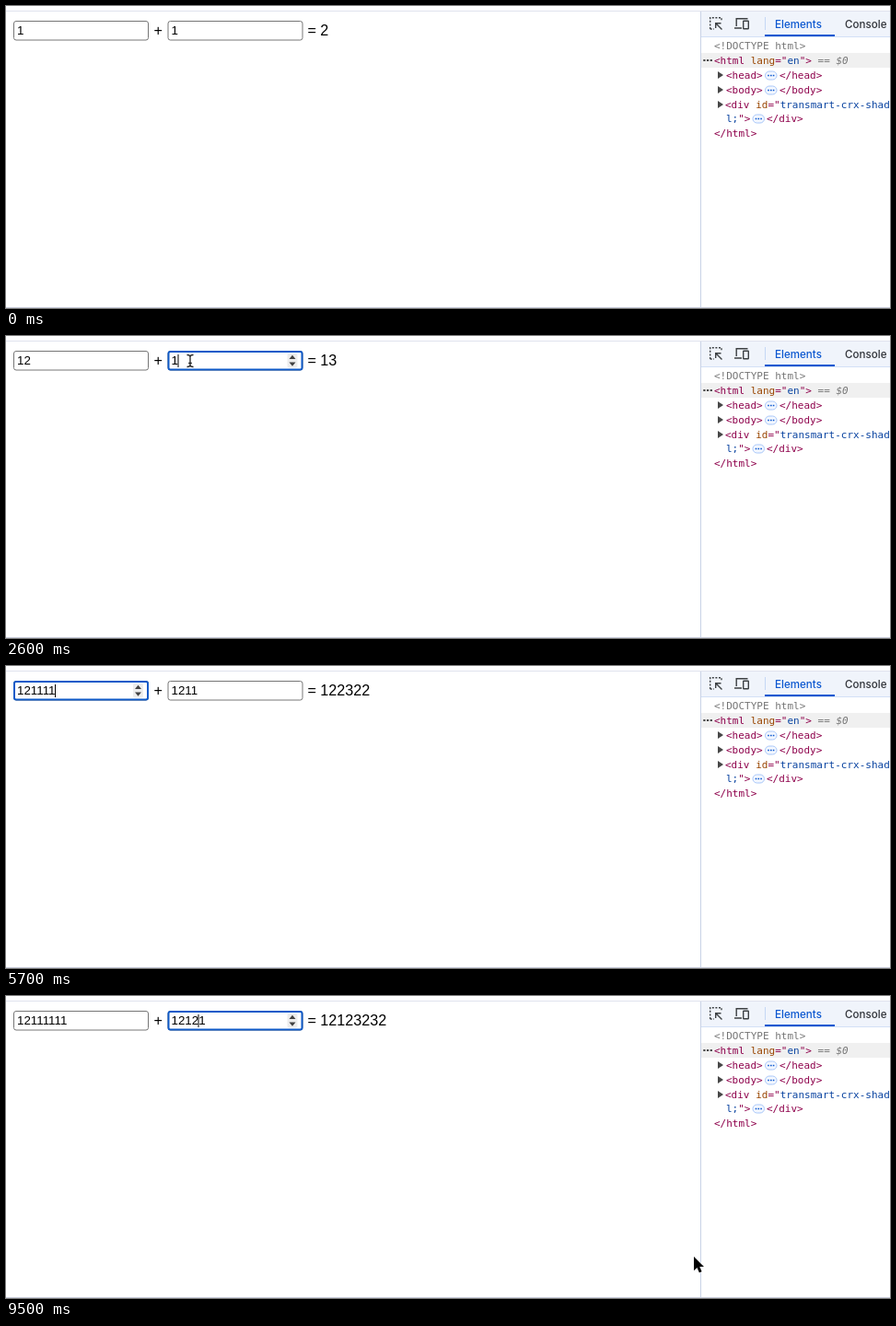
These frames come from a looping animation (960 by 328 pixels, 9.6 s). An HTML page:

```html
<!DOCTYPE html>
<html lang="en">
<head>
<meta charset="utf-8">
<title>Sum of two inputs</title>
<style>
  html, body { margin: 0; width: 100%; height: 100%; overflow: hidden; background: #fff; }
  svg { display: block; }
  text { white-space: pre; }
  .page { font: 16.2px "Liberation Sans", Arial, sans-serif; fill: #000; }
  .value { font: 13.333px "Liberation Sans", Arial, sans-serif; fill: #000; }
  .tab { font: 500 11.6px Inter, sans-serif; }
  .code { font: 11px "DejaVu Sans Mono", monospace; fill: #8e004b; }
  .attr { fill: #994500; }
  .str { fill: #0842a0; }
  .dim { fill: #757575; }
</style>
</head>
<body>
<svg width="960" height="328" viewBox="0 0 960 328">
  <defs>
    <g id="badge">
      <rect x=".5" y="-4.5" width="12.5" height="9" rx="4.5" fill="#f3f7fe" stroke="#a8c7fa"/>
      <path d="M3.2 0h1.6M6 0h1.6M8.8 0h1.6" stroke="#0b57d0" stroke-width="1.7"/>
    </g>
    <path id="fold" d="M0 -4L6 0L0 4Z" fill="#474747"/>
  </defs>

  <path d="M0 5.5H960" stroke="#dfe2ee"/>

  <g id="fields"></g>
  <text class="page" x="160.5" y="32">+</text>
  <text class="page" x="327.4" y="32" id="sum"></text>

  <rect x="755" y="6" width="205" height="27" fill="#f0f4fb"/>
  <path d="M755 33.5H960" stroke="#d3e0f6"/>
  <path d="M824.5 12V26" stroke="#c4d7f5"/>
  <rect x="824" y="31" width="76" height="2" fill="#0b57d0"/>
  <text class="tab" x="835" y="23.7" fill="#0b57d0">Elements</text>
  <text class="tab" x="911" y="23.7" fill="#303338">Console</text>

  <g fill="none" stroke="#3c4043" stroke-width="1.4">
    <path d="M764.7 25V12.7H777V17M764.7 25H769" stroke-dasharray="2 1.6"/>
    <path d="M777.5 25.5L771 19M770.7 24V18.7H776.5"/>
    <path d="M793.2 22V13.7H805.5M791 24H799"/>
    <rect x="800.7" y="16.2" width="5.6" height="8.6" rx=".6"/>
  </g>

  <rect x="755" y="51" width="205" height="16" fill="#f0f0f0"/>
  <path d="M757.3 59h2.2M761 59h2.2M764.7 59h2.2" stroke="#474747" stroke-width="2"/>
  <g class="code">
    <text class="dim" x="769" y="47">&lt;!DOCTYPE html&gt;</text>
    <text x="769" y="63">&lt;html <tspan class="attr">lang</tspan>="<tspan class="str">en</tspan>"&gt;<tspan class="dim"> == <tspan font-style="italic">$0</tspan></tspan></text>
    <text x="782" y="79">&lt;head&gt;</text>
    <text x="840" y="79">&lt;/head&gt;</text>
    <text x="782" y="95">&lt;body&gt;</text>
    <text x="840" y="95">&lt;/body&gt;</text>
    <text x="781" y="111">&lt;div <tspan class="attr">id</tspan>="<tspan class="str">transmart-crx-shad</tspan></text>
    <text x="782" y="126"><tspan class="str">l;</tspan>"&gt;</text>
    <text x="826" y="126">&lt;/div&gt;</text>
    <text x="769" y="141.5">&lt;/html&gt;</text>
  </g>
  <use href="#fold" x="773" y="75"/>
  <use href="#fold" x="773" y="91"/>
  <use href="#fold" x="773" y="107"/>
  <use href="#badge" x="824" y="75.5"/>
  <use href="#badge" x="824" y="91.5"/>
  <use href="#badge" x="810.5" y="122.5"/>

  <path d="M754.5 6V328" stroke="#c9d2e6"/>
  <path d="M0 327.5H960" stroke="#cdd0de"/>

  <g id="pointer">
    <path id="arrow" d="M0 0V15.2L3.5 12L5.9 17.4L8.6 16.2L6.3 11H11Z" fill="#000" stroke="#fff" stroke-width="1.2" paint-order="stroke"/>
    <path id="beam" d="M-3.5 -6.5Q0 -6.5 0 -4.5Q0 -6.5 3.5 -6.5M0 -5V5M-3.5 6.5Q0 6.5 0 4.5Q0 6.5 3.5 6.5M-1.8 2.5H1.8" fill="none" stroke="#222" stroke-width="1.3"/>
  </g>
</svg>
<script>
const LOOP = 9600, TICK = 50, BLINK = 500;

// time, first value, second value, focused field, caret index
const edits = [
  [0, "1", "1", 0, 0],
  [1300, "1", "1", 1, 1],
  [1800, "12", "1", 1, 2],
  [2500, "12", "1", 2, 1],
  [2850, "12", "12", 2, 2],
  [3500, "12", "12", 1, 2],
  [3700, "121", "12", 1, 3],
  [4100, "121", "12", 2, 2],
  [4350, "121", "121", 2, 3],
  [4500, "121", "1211", 2, 4],
  [5000, "121", "1211", 1, 3],
  [5250, "1211", "1211", 1, 4],
  [5450, "12111", "1211", 1, 5],
  [5650, "121111", "1211", 1, 6],
  [5850, "1211111", "1211", 1, 7],
  [6000, "12111111", "1211", 1, 8],
  [7100, "12111111", "1211", 2, 3],
  [7500, "12111111", "12121", 2, 4]
];

// time, x, y; a bare time hides the pointer, as typing does
const moves = [
  [0],
  [200, 545, 312], [250, 470, 229], [300, 415, 187], [350, 346, 157], [400, 281, 149],
  [450, 236, 137], [550, 173, 105], [650, 118, 73], [700, 106, 57], [850, 104, 32],
  [1800],
  [2150, 104, 32], [2500, 196, 27], [2600, 200, 27],
  [2850],
  [3200, 200, 27], [3450, 90, 29],
  [3700],
  [3850, 90, 29], [4100, 206, 30], [4200, 208, 30],
  [4350],
  [4700, 208, 30], [5000, 80, 30],
  [5250],
  [6400, 80, 30], [6900, 203, 29],
  [7500],
  [7550, 203, 29], [7800, 700, 258], [7900, 738, 275], [8250, 747, 283]
];

const $ = id => document.getElementById(id);
const show = (el, on) => el.setAttribute("visibility", on ? "inherit" : "hidden");

function makeField(x) {
  const g = document.createElementNS("http://www.w3.org/2000/svg", "g");
  g.setAttribute("transform", `translate(${x} 16)`);
  g.innerHTML = `
    <rect x=".5" y=".5" width="146" height="20.5" rx="2.5" fill="#fff" stroke="#767676"/>
    <rect x="1" y="1" width="145" height="19.5" rx="2" fill="none" stroke="#0f5ac8" stroke-width="2"/>
    <g><rect x="130" y="3" width="11" height="15.5" rx="2" fill="#ededed"/>
    <path d="M132 9L135.5 4.8L139 9ZM132 12.5L135.5 16.7L139 12.5Z" fill="#424242"/></g>
    <text class="value" x="4" y="15.3"></text>
    <path d="M0 4V18" stroke="#000"/>`;
  $("fields").append(g);
  const [, ring, spin, text, caret] = g.children;
  return { x, ring, spin, text, caret };
}

const fields = [makeField(8), makeField(175.5)];

const lastIndex = (rows, t) => rows.findLastIndex(row => row[0] <= t);

function pointerAt(t) {
  const i = lastIndex(moves, t);
  const [t0, x0, y0] = moves[i];
  if (x0 === undefined) return null;
  const [t1, x1, y1] = moves[i + 1] || [];
  if (x1 === undefined) return [x0, y0];
  const k = (t - t0) / (t1 - t0);
  return [x0 + (x1 - x0) * k, y0 + (y1 - y0) * k];
}

function draw(t) {
  const [since, a, b, focus, index] = edits[lastIndex(edits, t)];
  const pos = pointerAt(t);
  const inRow = pos && pos[1] > 16 && pos[1] < 38;
  const lit = Math.floor((t - since) / BLINK) % 2 === 0;

  fields.forEach((f, i) => {
    const focused = focus === i + 1;
    const hovered = inRow && pos[0] > f.x && pos[0] < f.x + 147;
    f.text.textContent = [a, b][i];
    show(f.ring, focused);
    show(f.spin, focused || hovered);
    show(f.caret, focused && lit);
    if (focused) {
      const x = 4 + f.text.getSubStringLength(0, index);
      f.caret.setAttribute("transform", `translate(${Math.round(x * 2) / 2} 0)`);
    }
  });
  $("sum").textContent = "= " + (Number(a) + Number(b));

  show($("pointer"), pos);
  if (pos) {
    const overText = inRow && pos[0] < 355;
    $("pointer").setAttribute("transform", `translate(${pos})`);
    show($("beam"), overText);
    show($("arrow"), !overText);
  }
}

function frame() {
  const t = performance.now() % LOOP;
  draw(Math.floor(t / TICK) * TICK);
  requestAnimationFrame(frame);
}
frame();
</script>
</body>
</html>
```
